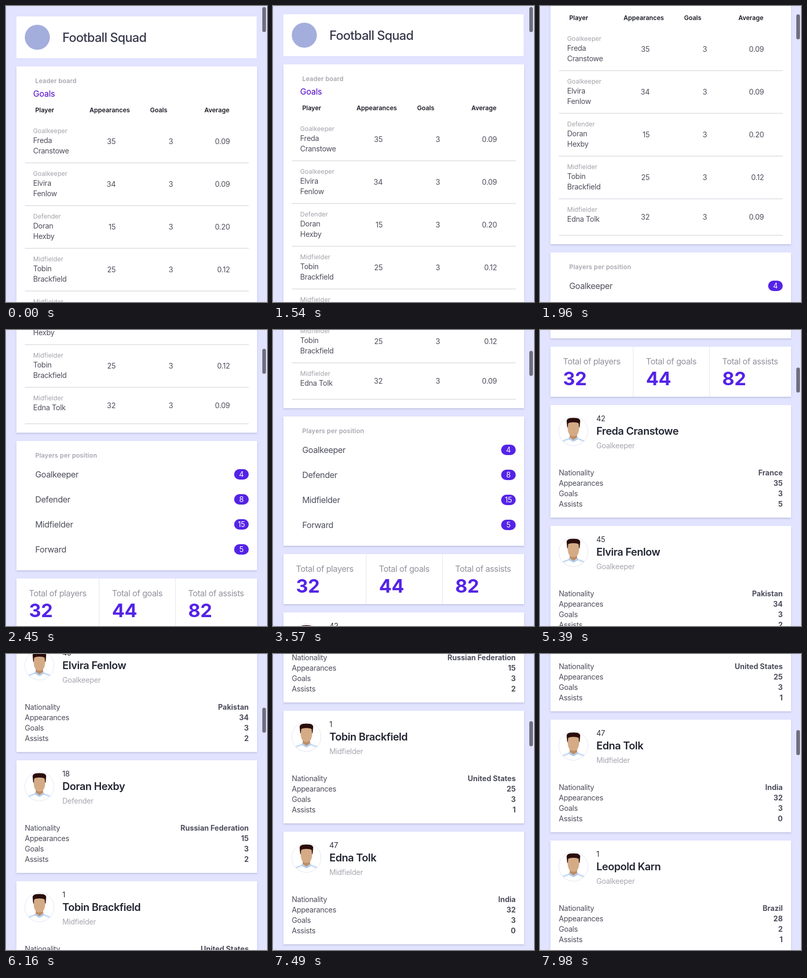
Animation, 500 px wide and 568 px high, one loop 8 s. Source, as an HTML page:

```html
<!DOCTYPE html>
<html lang="en">
<head>
<meta charset="utf-8">
<title>Football Squad</title>
<style>
  html, body { margin: 0; width: 100%; height: 100%; overflow: hidden; background: #e1e3ff; }
  #stage { position: relative; width: 500px; height: 568px; overflow: hidden;
    font: 400 14px/20px Inter, sans-serif; letter-spacing: -.018em; color: #4d4e5c; }
  #page { position: absolute; left: 0; top: 0; width: 500px; height: 2420px; }
  #page > * { position: absolute; white-space: nowrap; }
  #thumb { position: absolute; left: 491px; top: 2px; width: 7px; height: 48px; border-radius: 4px; background: #6e6e80; }
  .card { left: 20px; width: 461px; background: #fff; box-shadow: 0 2px 3px rgba(40, 40, 80, .17); }
  .card.flat { width: 460px; box-shadow: none; }
  .line { left: 36px; width: 429px; height: 2px; background: #e6e6ea; }
  .divider { width: 1px; height: 96px; background: #e4e5f4; }
  .emblem { left: 36px; top: 36px; width: 48px; height: 48px; border-radius: 50%; background: #a3aedd; }
  .title { font-size: 24px; font-weight: 500; letter-spacing: -.03em; color: #383a4b; }
  .caption { font-size: 12px; font-weight: 600; letter-spacing: .015em; color: #a6a6b0; }
  .tab { font-size: 16px; color: #5207c9; }
  .head { font-size: 12px; font-weight: 600; letter-spacing: 0; color: #1b1c26; }
  .role { font-size: 12px; letter-spacing: .005em; color: #a2a2aa; }
  .row { font-size: 16px; letter-spacing: -.024em; }
  .badge { left: 437px; width: 28px; height: 20px; border-radius: 10px; background: #5423e7; color: #fff; text-align: center; }
  .label { font-size: 16px; letter-spacing: -.024em; color: #91919d; }
  .total { font-size: 36px; font-weight: 700; color: #5423e7; }
  .shirt { color: #2c2d38; }
  .name { font-size: 20px; font-weight: 600; letter-spacing: -.022em; color: #222531; }
  .post { color: #a6a6b0; }
  .value { font-weight: 700; letter-spacing: 0; }
</style>
</head>
<body>
<div id="stage">
  <div id="page"></div>
  <div id="thumb"></div>
</div>
<script>
const page = document.getElementById('page');
const thumb = document.getElementById('thumb');
const parts = [];

// y is the middle of the text line
const text = (x, y, str, cls = '') =>
  parts.push(`<span class="${cls}" style="left:${x}px;top:${y - 10}px">${str}</span>`);
const textEnd = (x, y, str, cls = '') =>
  parts.push(`<span class="${cls}" style="right:${500 - x}px;top:${y - 10}px">${str}</span>`);
const card = (top, height, cls = '') =>
  parts.push(`<div class="card ${cls}" style="top:${top}px;height:${height}px"></div>`);

const avatar = top => parts.push(`
  <svg style="left:35px;top:${top}px" width="58" height="58" viewBox="-29 -29 58 58">
    <clipPath id="round"><circle r="28"/></clipPath>
    <circle r="28" fill="#fff" stroke="#e3e5f3"/>
    <g clip-path="url(#round)">
      <path d="M-28 23Q-20 18-9 15M28 23Q20 18 9 15" fill="none" stroke="#b9d2f0" stroke-width="2"/>
      <path d="M-28 26Q-20 21-11 18M28 26Q20 21 11 18" fill="none" stroke="#dbe6f6"/>
      <path d="M-7 2H7V13L0 18L-7 13Z" fill="#bd8d66"/>
      <path d="M-8 11L0 17L8 11L10 15L1 20H-1L-10 15Z" fill="#b5cdea"/>
      <path d="M-12-8L-13-20Q-12-24-7-25Q0-26 7-25Q12-24 13-20L12-8L10-5H-10Z" fill="#2a0d0b"/>
      <path d="M-10-15Q-7-17 0-17Q7-17 10-15L11-7Q11 4 6 8Q0 12-6 8Q-11 4-11-7Z" fill="#d5ab86"/>
    </g>
  </svg>`);

const players = [
  // first name, last name, role, shirt, country, appearances, goals, assists
  ['Freda', 'Cranstowe', 'Goalkeeper', 42, 'France', 35, 3, 5],
  ['Elvira', 'Fenlow', 'Goalkeeper', 45, 'Pakistan', 34, 3, 2],
  ['Doran', 'Hexby', 'Defender', 18, 'Russian Federation', 15, 3, 2],
  ['Tobin', 'Brackfield', 'Midfielder', 1, 'United States', 25, 3, 1],
  ['Edna', 'Tolk', 'Midfielder', 47, 'India', 32, 3, 0],
  ['Leopold', 'Karn', 'Goalkeeper', 1, 'Brazil', 28, 2, 1]
];

function header() {
  card(20, 80, 'flat');
  parts.push('<div class="emblem"></div>');
  text(108, 61, 'Football Squad', 'title');
}

function leaderBoard() {
  card(116, 518);
  text(56, 144, 'Leader board', 'caption');
  text(52, 168, 'Goals', 'tab');
  [[56, 'Player'], [160, 'Appearances'], [276, 'Goals'], [380, 'Average']]
    .forEach(([x, str]) => text(x, 200, str, 'head'));
  players.slice(0, 5).forEach(([first, last, role, , , games, goals], i) => {
    const y = 240 + 82 * i;
    const short = i === 4;
    const mid = y + (short ? 14 : 20);
    text(52, y, role, 'role');
    if (short) {
      text(52, y + 18, `${first} ${last}`);
    } else {
      text(52, y + 18, first);
      text(52, y + 38, last);
    }
    textEnd(210, mid, games);
    textEnd(320, mid, goals);
    textEnd(429, mid, (goals / games).toFixed(2));
    parts.push(`<div class="line" style="top:${y + (short ? 48 : 60)}px"></div>`);
  });
}

function positions() {
  card(650, 248);
  text(56, 678, 'Players per position', 'caption');
  [['Goalkeeper', 4], ['Defender', 8], ['Midfielder', 15], ['Forward', 5]].forEach(([role, count], i) => {
    const y = 714 + 48 * i;
    text(56, y, role, 'row');
    parts.push(`<div class="badge" style="top:${y - 10}px">${count}</div>`);
  });
}

function totals() {
  card(914, 96);
  [[44, 'players', 32], [203, 'goals', 44], [349, 'assists', 82]].forEach(([x, what, sum], i) => {
    text(x, 942, `Total of ${what}`, 'label');
    text(x, 975, sum, 'total');
    if (i) parts.push(`<div class="divider" style="left:${x - 25}px;top:914px"></div>`);
  });
}

function playerCard([first, last, role, shirt, country, games, goals, assists], i) {
  const top = 1026 + 232 * i;
  card(top, 216);
  avatar(top + 21);
  text(108, top + 26, shirt, 'shirt');
  text(108, top + 50, `${first} ${last}`, 'name');
  text(108, top + 78, role, 'post');
  [['Nationality', country], ['Appearances', games], ['Goals', goals], ['Assists', assists]]
    .forEach(([label, value], row) => {
      const y = top + 130 + 20 * row;
      text(36, y, label);
      textEnd(465, y, value, 'value');
    });
}

header();
leaderBoard();
positions();
totals();
players.forEach(playerCard);
page.innerHTML = parts.join('');

const LOOP = 8000, STEP = 70;
const swipes = [
  { start: 1470, time: 1330, distance: 477, decay: 3.18 },
  { start: 3500, time: 1050, distance: 398, decay: 4 },
  { start: 5320, time: 1120, distance: 421, decay: 4.5 },
  { start: 7070, time: 1260, distance: 534, decay: 7.65 }
];

// Quick start, then a long glide to rest
function scrollAt(t) {
  return swipes.reduce((sum, { start, time, distance, decay }) => {
    const x = Math.min(1, Math.max(0, (t - start) / time));
    return sum + distance * (1 - (1 - x * x) ** decay);
  }, 0);
}

const origin = performance.now();
function draw() {
  const t = (performance.now() - origin) % LOOP;
  const y = Math.round(scrollAt(Math.floor(t / STEP) * STEP));
  page.style.transform = `translateY(${-y}px)`;
  thumb.style.transform = `translateY(${Math.round(y * .0788)}px)`;
  requestAnimationFrame(draw);
}
draw();
</script>
</body>
</html>
```
